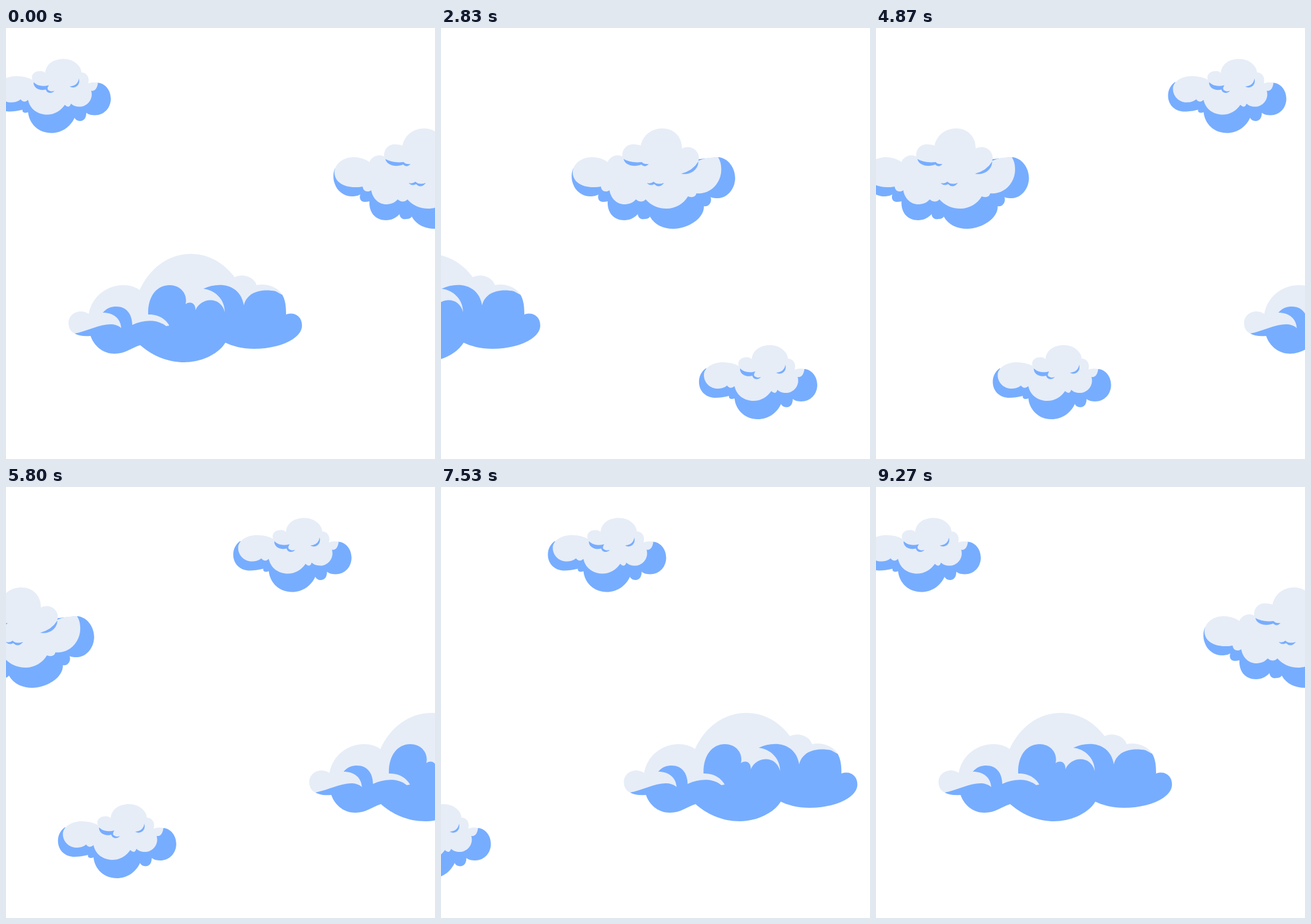
Write an HTML page that moves like this. It is 700 px wide and 704 px high and loops after 9.31 s.

```html
<!DOCTYPE html>
<html lang="en">
<head>
<meta charset="utf-8">
<title>Drifting clouds</title>
<style>
  html, body { margin: 0; width: 100%; height: 100%; overflow: hidden; background: #fff; }
  svg { display: block; width: 100%; height: 100%; }
  .shade { fill: #77adff; }
  .light { fill: #e6edf7; }
</style>
</head>
<body>
<svg viewBox="0 0 700 704">
  <defs>
    <g id="small">
      <path class="shade" d="M432 556C424 562 421 570 421 578C421 594 433 604 448 604Q458 604 470 601C469 606 474 607 479 605C481 625 497 639 517 639C534 639 548 629 555 614C557 621 574 624 574 606C578 609 583 610 588 610C603 610 614 598 614 583C614 569 605 558 593 557L570 560L450 560Z"/>
      <path class="light" d="M460 546Q475 546 486 552C483 545 489 538 497 538Q503 537 507 541C508 527 520 518 537 518C554 518 566 530 566 540C575 540 580 549 577 558Q584 555 593 557C592 566 588 571 582 570C586 583 576 596 563 596C557 596 552 594 549 591Q546 600 539 593C532 603 522 609 510 609C495 609 482 600 479 585Q472 591 467 584C462 588 457 589 451 589C439 589 429 579 429 567C429 555 443 546 460 546Z"/>
      <path class="shade" d="M488 556Q497 565 513 561Q508 568 514 570Q517 572 522 570C519 575 510 575 508 568C498 571 487 565 488 556Z"/>
      <path class="shade" d="M562 550C565 561 555 568 547 563Q560 562 562 550Z"/>
    </g>

    <g id="medium">
      <path class="shade" d="M363 229C359 237 360 248 362 253C366 268 380 276 393 275Q399 275 404 272C402 279 405 284 411 284Q416 284 419 283C418 303 430 314 446 314C455 314 463 310 468 304C469 311 474 313 479 312Q486 312 488 308C496 322 510 328 526 328C550 328 577 311 576 291C583 293 590 285 587 276C590 278 596 278 600 278C615 277 627 262 627 245C627 229 616 212 599 211L560 215L400 240Z"/>
      <path class="light" d="M393 211Q408 211 419 219C422 210 434 205 443 210C442 198 450 190 460 190Q468 190 473 192C476 176 490 164 508 164C527 164 541 178 540 197C554 190 568 199 568 213L567 217Q578 211 599 211C604 218 605 228 604 237C601 257 584 272 564 270Q561 279 550 275C543 287 530 295 515 295C501 295 489 289 481 280Q474 287 465 280C460 286 453 288 446 288C435 288 424 279 422 265C415 270 408 265 408 259C404 260 399 260 395 260C375 260 362 250 362 236C362 222 376 211 393 211Z"/>
      <path class="shade" d="M445 214Q457 221 475 219Q478 223 486 222Q480 229 474 223C462 228 447 224 445 214Z"/>
      <path class="shade" d="M567 218C567 232 553 241 539 238Q558 233 567 218Z"/>
      <path class="shade" d="M483 253Q489 255 494 251Q500 257 511 253Q503 263 495 255Q488 259 483 253Z"/>
    </g>

    <g id="large">
      <path class="light" d="M112 499C105 496 102 489 102 482C102 465 122 458 135 467C140 438 165 420 192 420Q207 420 218 428C234 393 264 369 302 369C330 369 355 383 373 407C387 400 405 407 409 420C425 416 445 424 451 436L440 480L140 502Z"/>
      <path class="shade" d="M112 499C138 494 170 474 188 490C187 475 176 465 158 465C165 457 172 455 180 455C197 455 206 468 206 485C232 473 262 476 271 502C270 482 254 467 232 468C231 440 245 420 267 420C285 420 297 435 293 451C302 445 310 451 309 461C318 440 350 437 357 464C357 443 341 428 322 426C350 413 383 420 388 453C394 429 420 426 440 430L451 436L440 512L138 503C128 504 119 503 112 499Z"/>
      <path class="shade" d="M451 436C456 445 457 455 457 468C472 463 483 472 483 486C483 508 445 524 405 524C385 524 368 519 358 514C345 535 315 546 291 546C262 546 237 534 219 518C205 522 195 532 177 532C157 532 143 518 138 503L200 498L300 480L420 450Z"/>
    </g>

    <g id="sky">
      <use href="#small" x="-443" y="-467.5"/>
      <use href="#small" x="321"/>
      <use href="#medium" x="174"/>
      <use href="#large"/>
    </g>
  </defs>
  <g id="strip">
    <use href="#sky"/>
    <use href="#sky" x="1050"/>
  </g>
</svg>
<script>
  const LOOP = 9310, STEPS = 278, STEP_MS = 100 / 3, SPAN = 1050;
  const strip = document.getElementById('strip');
  const start = performance.now();

  function draw(now) {
    const t = Math.max(0, now - start) % LOOP;
    // Step times are rounded to 10 ms, so look slightly ahead.
    const step = Math.min(STEPS, Math.floor((t + 4) / STEP_MS));
    strip.setAttribute('transform', `translate(${-SPAN * step / STEPS} 0)`);
    requestAnimationFrame(draw);
  }
  draw(start);
</script>
</body>
</html>
```
